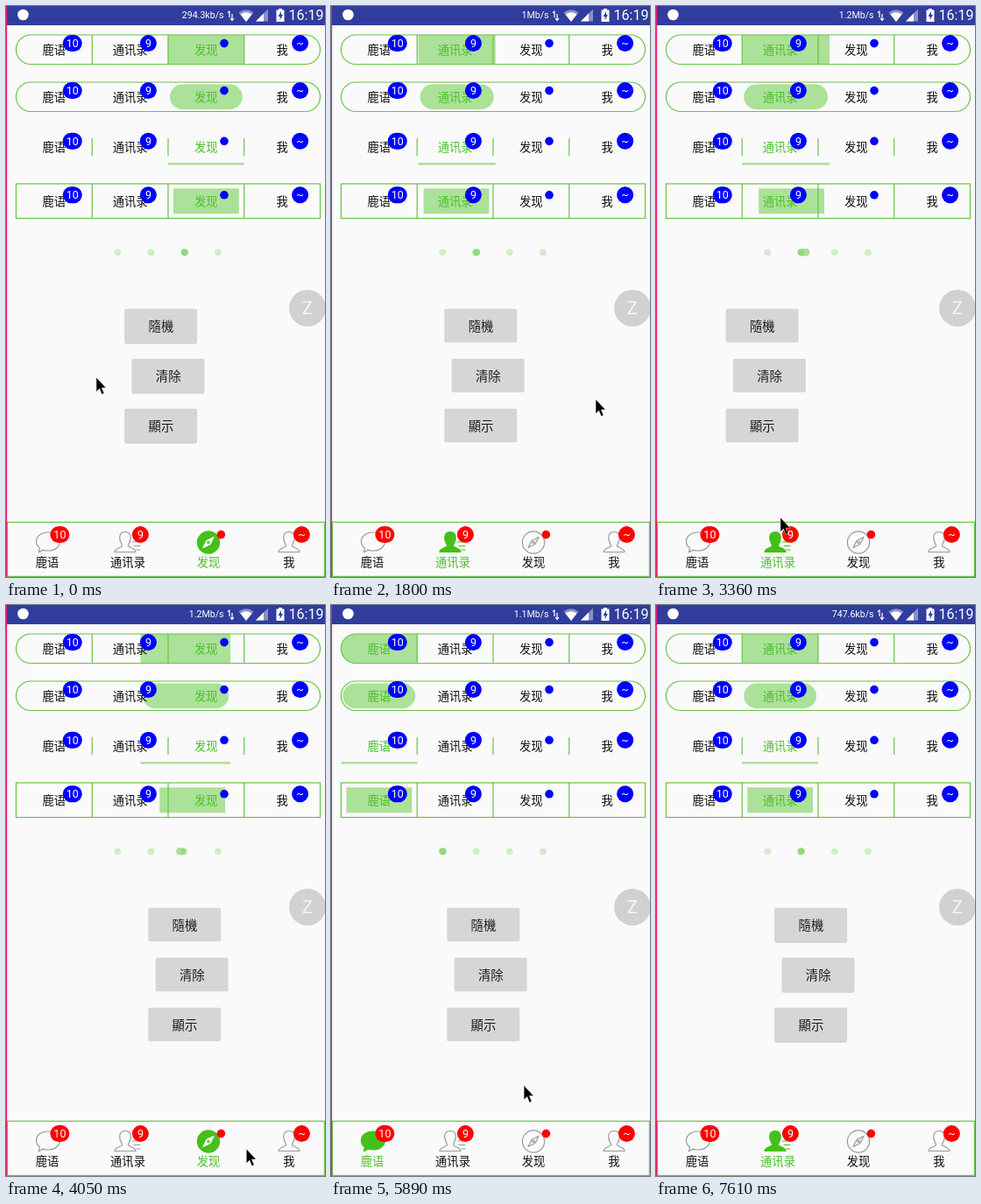
An HTML page for the animation above (8 s loop, 364 by 652 pixels).

```html
<!DOCTYPE html>
<html lang="zh">
<head>
<meta charset="utf-8">
<title>Tab indicators</title>
<style>
html, body { margin: 0; width: 100%; height: 100%; overflow: hidden; background: #fafafa; }
svg { display: block; width: 364px; height: 652px; overflow: hidden; }
text { font-family: Roboto, "Noto Sans CJK SC", "Noto Sans CJK", sans-serif; text-anchor: middle; }
.tint { fill: #45c01a; fill-opacity: .44; }
.line { fill: none; stroke: #66c546; stroke-width: 1.2; }
.label { font-size: 13.3px; fill: #111; }
.on .label { fill: #4cbf2c; }
.badge text { font-size: 12.5px; fill: #fff; }
.icon { fill: none; stroke: #9a9a9a; stroke-width: 1.2; stroke-linejoin: round; stroke-linecap: round; }
.on .icon { stroke: #45c01a; }
.on .solid { fill: #45c01a; }
.on .needle { fill: #fff; stroke: #fff; }
.btn text { font-size: 14.4px; fill: #1c1c1c; }
.btn .shade { fill: #000; fill-opacity: .17; visibility: hidden; }
.rest .shade { visibility: visible; }
</style>
</head>
<body>
<svg id="stage" viewBox="0 0 364 652"></svg>
<script>
const stage = document.getElementById('stage');

function set(n, attrs) {
  for (const k in attrs) n.setAttribute(k, attrs[k]);
}
function el(tag, attrs, parent = stage, text) {
  const n = document.createElementNS('http://www.w3.org/2000/svg', tag);
  set(n, attrs);
  if (text) n.textContent = text;
  parent.appendChild(n);
  return n;
}

const LEFT = 11.5, TAB = 86.75, PITCH = 372, LOOP = 8000;
const names = ['鹿语', '通讯录', '发现', '我'];
const marks = ['10', '9', '', '~'];
const tabs = [[], [], [], []];
const tabX = i => LEFT + TAB * i;
const dotX = i => 127.4 + 38.2 * i;

function badge(i, x, y, color, parent) {
  const g = el('g', { class: 'badge', transform: `translate(${x} ${y})` }, parent);
  if (!marks[i]) return el('circle', { r: 4.8, fill: color }, g);
  const w = marks[i].length > 1 ? 22 : 19;
  el('rect', { x: -w / 2, y: -9.5, width: w, height: 19, rx: 9.5, fill: color }, g);
  el('text', { y: 4.4 }, g, marks[i]);
}

// Pages of buttons
const pages = names.map(() => {
  const g = el('g', { class: 'btn' });
  ['隨機', '清除', '顯示'].forEach((s, i) => {
    const x = i === 1 ? 143.5 : 135.2, y = 345.7 + 57 * i;
    el('rect', { class: 'shade', x: x + .3, y: y + 1.6, width: 82.4, height: 38.5, rx: 2 }, g);
    el('rect', { x, y, width: 83, height: 38.5, rx: 2, fill: '#d6d6d7' }, g);
    el('text', { x: x + 41.7, y: y + 24.8 }, g, s);
  });
  return g;
});

// Four indicator strips
const clip = el('clipPath', { id: 'capsule' });
el('rect', { x: LEFT, y: 33, width: 347, height: 33.5, rx: 16.7 }, clip);
const [block, pill, under, box] = [[33, 33.5, 0], [89.5, 28.5, 14.2], [179, 2.6, 0], [208.3, 29, 0]]
  .map(([y, height, rx]) => el('rect', { class: 'tint', y, height, rx }));
set(block, { 'clip-path': 'url(#capsule)' });
[[33, 33.5, 16.7], [87, 33.5, 16.7], [203, 39.5, 0]].forEach(([y, height, rx]) =>
  el('rect', { class: 'line', x: LEFT, y, width: 347, height, rx }));
[[33, 66.5], [151, 171], [203, 242.5]].forEach(([a, b]) => {
  for (let i = 1; i < 4; i++) el('path', { class: 'line', d: `M${tabX(i)} ${a}V${b}` });
});
[49.8, 103.8, 161.5, 223].forEach(y => names.forEach((s, i) => {
  const g = el('g', {});
  el('text', { class: 'label', x: tabX(i + .5), y: y + 4.7 }, g, s);
  tabs[i].push(g);
  badge(i, 75.8 + 86.6 * i, y - 7.2, '#00f');
}));

// Page dots
names.forEach((s, i) => el('circle', { cx: dotX(i), cy: 281.3, r: 3.9, fill: '#d2edc9' }));
const bar = el('rect', { class: 'tint', y: 277.2, height: 8.2, rx: 4.1 });

// Floating button
el('circle', { cx: 344, cy: 345, r: 21, fill: '#969696', 'fill-opacity': .42 });
el('text', { x: 344, y: 352.3, 'font-size': 20.5, fill: '#f6f6f6' }, stage, 'Z');

// Bottom navigation
el('rect', { x: 0, y: 589, width: 364, height: 63, fill: '#fafafa' });
el('rect', { class: 'line', x: 1.6, y: 589.4, width: 361.8, height: 62 });
const person = 'M-12 11C-12 6.5-4 6-3.4 4C-3.4 2-6.3-.5-6.3-5.3C-6.3-9.5-3.7-12 0-12S6.3-9.5 6.3-5.3C6.3-.5 3.4 2 3.4 4C4 6 12 6.5 12 11Z';
const icons = [
  ['M1-11.5C8.8-11.5 14.5-6.8 14.5-1S8.8 9.5 1 9.5C-1 9.5-3.2 9.2-4.6 8.6L-9.5 11.3L-8.5 6.4C-11 4.5-12.5 2-12.5-1C-12.5-6.8-6.8-11.5 1-11.5Z'],
  [person, 'M8.5-.5H15M10 4H17M13 8.5H17'],
  ['M-12.6 0A12.6 12.6 0 1 1 12.6 0A12.6 12.6 0 1 1-12.6 0Z', 'M6-6L2 2L-6 6L-2-2Z'],
  [person]
];
icons.forEach((paths, i) => {
  const x = 47 + 92 * i, g = el('g', {});
  const art = el('g', { transform: `translate(${i === 1 ? x - 3 : x} 612.5)` }, g);
  paths.forEach((d, k) => el('path', { class: 'icon ' + (k ? (i === 2 ? 'needle' : '') : 'solid'), d }, art));
  if (i === 2) el('circle', { r: 1.2, class: 'icon' }, art);
  el('text', { class: 'label', x, y: 639.5 }, g, names[i]);
  tabs[i].push(g);
  badge(i, x + 14.4, 603.6, '#f00');
});

// Status bar
el('rect', { width: 364, height: 22, fill: '#303d9d' });
el('circle', { cx: 19.5, cy: 10, r: 6.3, fill: '#fff' });
const speed = el('text', { x: 248.5, y: 14.4, 'font-size': 10.6, fill: '#fff', style: 'text-anchor:end' });
el('path', { d: 'M255 6V13M253 8L255 5.5M258 9V16M256 14L258 16.5L260 14', stroke: '#fff', fill: 'none', 'stroke-width': 1.2 });
el('path', { d: 'M265.5 7.5Q274 1 282.5 7.5L274 18Z', fill: '#8990c6' });
el('path', { d: 'M267.5 9.5Q274 5 280.5 9.5L274 18Z', fill: '#fff' });
el('path', { d: 'M285 17.5L299 3.5V17.5Z', fill: '#8990c6' });
el('path', { d: 'M285 17.5L294 8.5V17.5Z', fill: '#fff' });
el('path', { d: 'M308.5 4.5H311V3H315V4.5H317.5V18H308.5Z', fill: '#fff' });
el('path', { d: 'M314 6L310.5 12H312.6V16L316 10H314Z', fill: '#303d9d' });
el('text', { x: 342.5, y: 16.4, 'font-size': 16, fill: '#fff' }, stage, '16:19');
el('rect', { width: 1.2, height: 652, fill: '#f2146c' });

const cursor = el('path', { d: 'M0 0V16.5L3.7 13L6.3 19.5L9 18.3L6.3 12H11.2Z', fill: '#000', stroke: '#fff', 'stroke-width': .5 });

// Pointer stops: time, x, y
const stops = [
  [0, 103, 424], [150, 63, 434], [420, 63, 434], [1440, 302, 449], [2160, 302, 449],
  [2430, 264, 455], [2820, 111, 486], [3090, 76, 538], [3400, 222, 640], [3930, 228, 622],
  [4200, 332, 620], [4500, 332, 620], [5000, 57, 620], [5380, 57, 620], [5890, 274, 525],
  [6200, 274, 513], [6440, 75, 506], [7000, 75, 506], [7600, 98, 660]
];
// Swipes have a release time "up"; the others are taps on the bottom bar
const moves = [
  { t: 0, from: 2, to: 2 },
  { t: 420, up: 1506, from: 2, to: 1 },
  { t: 2430, up: 3110, from: 1, to: 2, back: true },
  { t: 3798, from: 1, to: 2 },
  { t: 4427, from: 2, to: 3 },
  { t: 5333, from: 3, to: 0 },
  { t: 6200, up: 6680, from: 0, to: 1 }
];
const speeds = [
  { t: 0, s: '294.3kb/s' }, { t: 540, s: '812.5kb/s' }, { t: 930, s: '1Mb/s' },
  { t: 2800, s: '1.2Mb/s' }, { t: 4690, s: '1.1Mb/s' }, { t: 7100, s: '747.6kb/s' }
];
const SLOP = 15, SETTLE = 618, SLIDE = 350;

const last = (list, t) => list.filter(k => k.t <= t).pop();
const clamp = v => Math.max(0, Math.min(1, v));
const late = u => Math.max(0, 2 * u - 1);

function pointer(t) {
  const j = stops.findIndex(s => s[0] > t);
  if (j < 0) return stops[stops.length - 1].slice(1);
  const [t0, x0, y0] = stops[j - 1], [t1, x1, y1] = stops[j];
  const u = (t - t0) / (t1 - t0);
  return [x0 + (x1 - x0) * u, y0 + (y1 - y0) * u];
}

// A swiped page follows the pointer; a released or tapped one settles on a quintic curve
function dragged(m, t) {
  const pull = Math.abs(pointer(t)[0] - pointer(m.t)[0]) - SLOP;
  return m.from + Math.sign(m.to - m.from) * Math.max(0, pull) / PITCH;
}
function pageAt(m, t) {
  if (m.up > t) return dragged(m, t);
  const a = m.up ? dragged(m, m.up) : m.from;
  const b = m.back ? m.from : m.to;
  const u = clamp((t - (m.up || m.t)) / SETTLE);
  return b + (a - b) * Math.pow(1 - u, 5);
}

// Pictures are held for about 132 ms, evenly spaced between a few anchors
const anchors = [0, 1800, 2820, 4050, 5350, 6590, 7610, LOOP];
function hold(t) {
  const j = anchors.findIndex(a => a > t), s = anchors[j - 1], d = anchors[j] - s;
  const step = d / Math.round(d / 132);
  return s + step * Math.floor((t - s) / step);
}

function span(rect, a, b) {
  set(rect, { x: a, width: b - a });
}

function draw(time) {
  const t = hold(time), m = last(moves, t), page = pageAt(m, t);

  pages.forEach((g, i) => {
    set(g, { transform: `translate(${(i - page) * PITCH} 0)` });
    g.classList.toggle('rest', Math.abs(i - page) < .002);
  });

  // The front edge leads, the rear edge starts halfway
  const u = m.up
    ? clamp((page - m.from) / (m.to - m.from))
    : (1 - Math.cos(Math.PI * clamp((t - m.t) / SLIDE))) / 2;
  const lead = m.from + (m.to - m.from) * u;
  const trail = m.from + (m.to - m.from) * late(u);
  const l = tabX(Math.min(lead, trail)), r = tabX(Math.max(lead, trail) + 1);
  span(block, l, r);
  span(pill, l + 2, r - 2);
  span(under, l, r);
  span(box, tabX(lead) + 6, tabX(lead + 1) - 6);

  const base = Math.floor(page);
  span(bar, dotX(base + late(page - base)) - 4.1, dotX(page) + 4.1);

  const pick = moves.filter(k => !k.back && (k.up || k.t) <= t).pop().to;
  tabs.forEach((list, i) => list.forEach(g => g.classList.toggle('on', i === pick)));
  speed.textContent = last(speeds, t).s;
  set(cursor, { transform: `translate(${pointer(t)})` });
}

const t0 = performance.now();
function tick() {
  draw((performance.now() - t0) % LOOP);
  requestAnimationFrame(tick);
}
tick();
</script>
</body>
</html>
```
